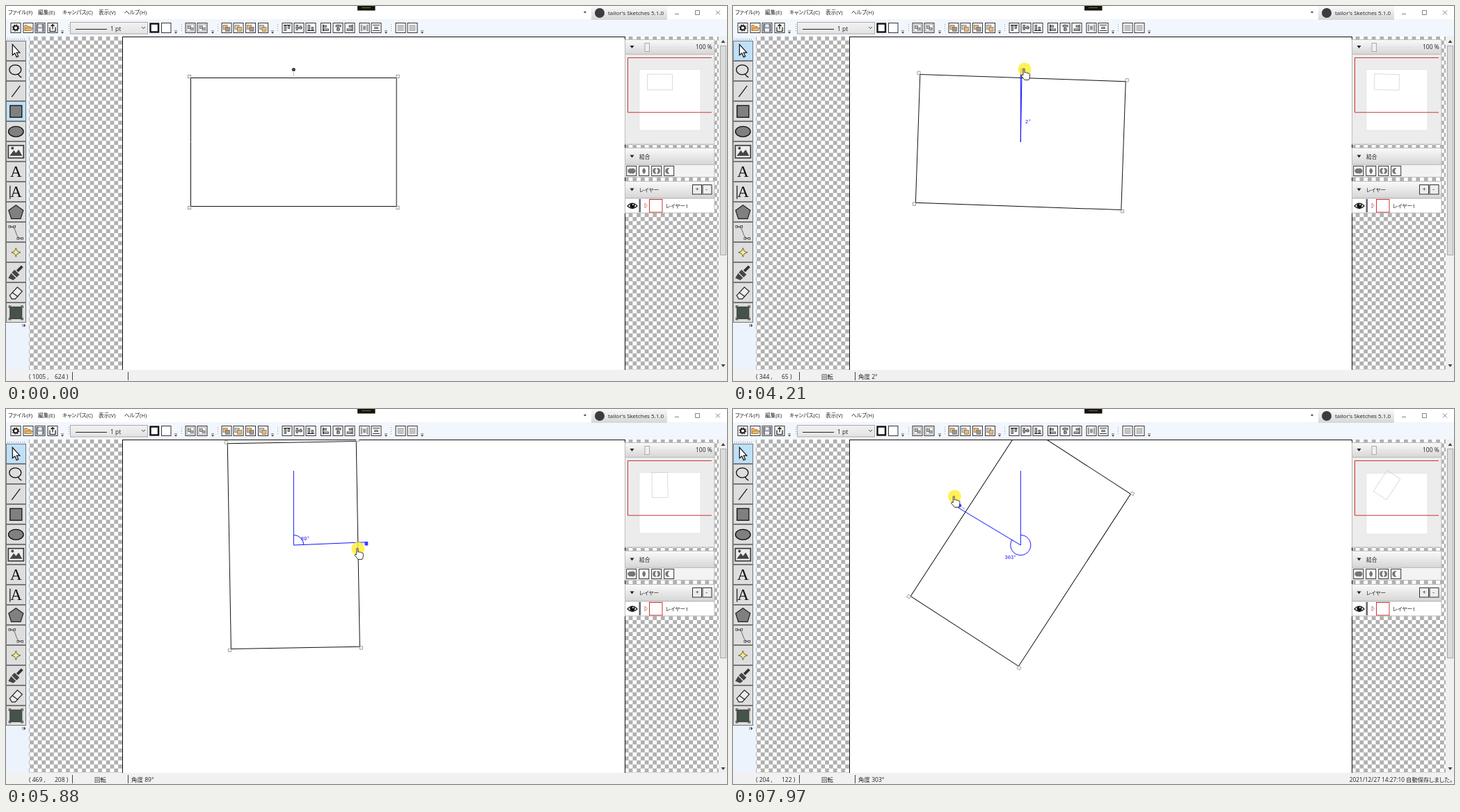
Animation of 1036x540 px, one loop 8000 ms. Source, as an HTML page:

```html
<!DOCTYPE html>
<html lang="ja">
<head>
<meta charset="utf-8">
<title>Rotate a rectangle</title>
<style>
html, body { margin: 0; width: 100%; height: 100%; overflow: hidden; background: #fff; }
svg { display: block; width: 1036px; height: 540px; }
text { font: 8.5px "Open Sans", "Noto Sans CJK JP", "Noto Sans CJK", sans-serif; fill: #222; white-space: pre; }
.kana { font-size: 7.7px; font-feature-settings: "palt"; }
.serif { font: 23px "Liberation Serif", serif; fill: #111; }
.degree { font: 7px "Liberation Mono", monospace; fill: #11f; }
</style>
</head>
<body>
<svg id="stage" viewBox="0 0 1036 540">
  <defs>
    <pattern id="checker" x="166.9" y="44" width="11.552" height="11.552" patternUnits="userSpaceOnUse">
      <path fill="#fff" d="M0 0h11.552v11.552H0z"/>
      <path fill="#b0b0b0" d="M0 0h5.776v5.776H0zM5.776 5.776h5.776v5.776H5.776z"/>
    </pattern>
    <linearGradient id="head" x2="0" y2="1"><stop stop-color="#fafafa"/><stop offset="1" stop-color="#d6d6d6"/></linearGradient>
    <linearGradient id="combo" x2="0" y2="1"><stop stop-color="#f2f2f2"/><stop offset="1" stop-color="#e3e3e3"/></linearGradient>
    <clipPath id="work"><path d="M33 44H889.5V524H33z"/></clipPath>
  </defs>
  <g id="back"></g>
  <g clip-path="url(#work)">
    <g id="shape" fill="none">
      <path stroke="#111" d="M-147.8-92.5H147.8V92.5H-147.8z"/>
      <path stroke="#bbb" d="M0-101V-95"/>
      <path id="ticks" stroke="#777" d="M-148-.5v1M148-.5v1M-.5-92h1M-.5 93h1"/>
      <g id="corners"></g>
      <circle id="knob" cy="-104.5" r="2.6"/>
    </g>
    <g id="guide" fill="none" stroke="#11f">
      <path id="rays"/>
      <path id="arc"/>
      <text id="degree" class="degree" stroke="none"></text>
    </g>
  </g>
  <g id="front"></g>
  <path id="thumbPage" fill="#fff" stroke="#ddd" stroke-width=".6" d="M910 91.5h88v87.5h-88z"/>
  <path id="thumbRect" fill="none" stroke="#ccc" stroke-width=".7" d="M-18-11.3H18V11.3H-18z"/>
  <path fill="none" stroke="#c33" d="M1014 74.5H893.5V153.2H1014"/>
  <g id="status">
    <text id="posX" x="33" y="536.5"></text>
    <text id="posY" x="70" y="536.5"></text>
    <text id="mode" x="127" y="536.5">回転</text>
    <text id="angle" x="180" y="536.5"></text>
    <text id="saved" x="1034" y="536.5" text-anchor="end" style="font-size:8.3px;font-feature-settings:'palt'">2021/12/27 14:27:10 自動保存しました。</text>
  </g>
  <g id="cursor">
    <circle id="glow" r="9.5" fill="#ffee3c" opacity=".85"/>
    <path id="arrow" fill="#fff" stroke="#222" stroke-width=".8" d="M0 0V11.5L2.6 9.2 4.4 13.2 6.2 12.4 4.5 8.5H8z"/>
    <path id="hand" fill="#fff" stroke="#222" stroke-width=".9" stroke-linejoin="round"
      d="M-2 8.5V0Q-1-1.5 0 0V5Q1.4 4 2.4 5.3 4 4.5 5 6 6.8 5.5 7.5 7.2V11Q7.3 13 6 15.5H0Q-1.5 13-4.6 10 -5.3 7.4-2 8.5z"/>
  </g>
</svg>
<script>
const $ = id => document.getElementById(id);
const LOOP = 8000, CX = 413.3, CY = 196, ZOOM = 0.722, RAD = Math.PI / 180;

// ---- static drawing helpers ----
const rect = (x, y, w, h, fill, stroke = 'none', sw = 1) =>
  `<rect x="${x}" y="${y}" width="${w}" height="${h}" fill="${fill}" stroke="${stroke}" stroke-width="${sw}"/>`;
const path = (d, stroke = '#222', fill = 'none', sw = 1) =>
  `<path d="${d}" stroke="${stroke}" fill="${fill}" stroke-width="${sw}"/>`;
const text = (x, y, s, cls = '') => `<text x="${x}" y="${y}" class="${cls}">${s}</text>`;
const at = (x, y, s) => `<g transform="translate(${x} ${y})">${s}</g>`;
const button = (x, y, glyph) => at(x, y, rect(-7, -7, 14, 14, '#fafafa', '#333') + glyph);
const down = (x, y) => path(`M${x} ${y}h6l-3 4z`, 'none', '#222');

function toolIcons() {
  const gray = '#808080';
  const node = (x, y) => rect(x - 1.3, y - 1.3, 2.6, 2.6, '#fff', '#333', .8);
  return [
    path('M-5-9.5V6L-1.5 3.2 1 8.8 3.4 7.7 1 2.4H5.5z', '#111', '#fff', 1.2),
    '<ellipse cx="-1" cy="-2" rx="8.5" ry="7" fill="none" stroke="#111" stroke-width="1.3"/>' + path('M3 4q1 3 5 5', '#111', 'none', 1.3),
    path('M-6 8L6-8', '#111', 'none', 1.2),
    rect(-8.5, -8.5, 17, 17, gray, '#111', 1.3),
    `<ellipse rx="10.8" ry="7.5" fill="${gray}" stroke="#111" stroke-width="1.3"/>`,
    rect(-11, -9, 22, 18, '#eee', '#444', 1.8) + path('M-9 6L-3-2 0 2 4-3 9 6z', 'none', '#444') + '<circle cx="-5" cy="-5" r="2" fill="#444"/>',
    text(-8.4, 7.3, 'A', 'serif'),
    text(-8, 7.3, 'A', 'serif') + path('M-8.5-9V10', '#111', 'none', 1.2),
    path('M0-10L10.5-2.5 6.7 9.5H-6.7L-10.5-2.5z', '#222', gray, 1.2),
    path('M-9-8H-2M-9-8C4-8-4 9 9 9M3 9H9', '#555', 'none', .9) + node(-9, -8) + node(-2, -8) + node(3, 9) + node(9, 9),
    path('M0-6.5L1.8-1.8 6.5 0 1.8 1.8 0 6.5-1.8 1.8-6.5 0-1.8-1.8z', '#554', '#fff07a', .9),
    path('M9-9L2-2', '#333', 'none', 4) + path('M-2-4L5 3 1 7-6 0zM-7 1L0 8-4 11-11 8z', 'none', '#444'),
    path('M-9 4L2-8 9-2-1 9H-6zM-5 0L3 6', '#222', '#eee', 1.2),
    rect(-8.5, -8.5, 17, 17, '#46534a', '#333') + path('M-10-7V-10H-7M7-10h3v3M10 7v3H7M-7 10h-3V7', '#333')
  ];
}

function topBar() {
  const orange = '#e9b96e', gray = '#999';
  const order = i => rect(-5, -4, 6, 6, i % 2 ? '#ccc' : orange, '#765', .7) + rect(-1.5, -1, 6, 6, i % 2 ? orange : gray, '#765', .7);
  const align = (turn, shift) => `<g transform="rotate(${turn})">` + path(`M-5 ${shift}H5`, '#222') +
    rect(-4, shift < 0 ? -3 : -4, 2.6, 7, '#aaa', '#333', .7) + rect(1, shift < 0 ? -3 : shift ? -1 : -2.5, 2.6, 4, '#aaa', '#333', .7) + '</g>';
  const pair = turn => `<g transform="rotate(${turn})">` + path('M-4-5V5M4-5V5M-1-3v6M1-3v6', '#333') + '</g>';
  const group = rect(-5, -5, 10, 10, 'none', '#888', .7) + rect(-3.5, -3, 4, 4, '#bbb', '#555', .7) + rect(0, 0, 4, 3, '#bbb', '#555', .7);
  let s = button(14, 31.5, '<circle r="3.1" fill="none" stroke="#222" stroke-width="2"/><circle r="4.6" fill="none" stroke="#222" stroke-width="1.3" stroke-dasharray="1.8"/>');
  s += button(32, 31.5, path('M-5 4V-4H-2L-1-2H3V0M-5 4L-3 0H6L4 4z', '#b8823c', orange));
  s += button(49, 31.5, rect(-5, -5, 10, 10, '#8c98a4', '#445') + rect(-2.5, -5, 5, 4, '#eee') + rect(-3, 1, 6, 4, '#fff'));
  s += button(67, 31.5, path('M-4-1V5H4V-1M0 2V-5M-2.5-2.5L0-5 2.5-2.5', '#111', 'none', 1.2));
  s += rect(92.5, 23.5, 111, 16.5, 'url(#combo)', '#aaa') + path('M100 33.5H145', '#222') + text(150, 35.5, '1 pt') + path('M195 30l2.5 2.5L200 30', '#444');
  s += rect(207.5, 25.5, 11.5, 12, '#fff', '#111', 2.4) + rect(223.5, 24.5, 13.5, 14, '#fff', '#333');
  [265, 282].forEach(x => s += button(x, 31.5, group));
  [317, 334, 351.5, 369.5].forEach((x, i) => s += button(x, 31.5, order(i)));
  [[404, 0, -4], [421, 0, 0], [438, 0, 4], [459.5, -90, -4], [477, 90, 0], [494, -90, 4]].forEach(([x, r, d]) => s += button(x, 31.5, align(r, d)));
  s += button(515, 31.5, pair(0)) + button(532, 31.5, pair(90));
  [567, 584].forEach(x => s += button(x, 31.5, rect(-4, -4, 8, 8, '#c4c4c4', '#aaa', .7)));
  [81, 244, 297, 383, 546, 598].forEach(x => s += path(`M${x - 2} 35.5h4M${x - 1.5} 37.5h3l-1.5 2z`, '#444', '#444', .6));
  [90, 252, 304, 390, 553].forEach(x => s += `<path d="M${x}.5 26V38" stroke="#999" stroke-dasharray="1 2"/>`);
  return s;
}

function titleBar() {
  return rect(841, 0, 109, 20, 'url(#head)') + '<circle cx="853" cy="10" r="7" fill="#3c3c40"/>' +
    `<g style="font-size:8px">${text(865, 13, "tailor's Sketches 5.1.0").replace('<text', '<text style="font-size:inherit"')}</g>` +
    path('M830 8h4l-2 2.5z', 'none', '#333') + path('M961 11.5h6M990.5 6.5h6v6h-6zM1020 6.5l6 6M1026 6.5l-6 6', '#777', 'none', .9) +
    rect(505, 0, 25.5, 6.5, '#15130c') + path('M511 2.5h13', '#766b3c') +
    [[3, 'ファイル(F)'], [46, '編集(E)'], [81, 'キャンパス(C)'], [133, '表示(V)'], [170, 'ヘルプ(H)']].map(([x, t]) => text(x, 11.5, t, 'kana')).join('');
}

function panels() {
  const header = (y, h, label) => rect(889.5, y, 128.5, h, 'url(#head)', '#bbb') + down(896.5, y + h / 2 - 2) + text(910, y + h / 2 + 3, label, 'kana');
  const body = (y, h, fill) => rect(889.5, y, 128.5, h, fill, '#bbb');
  const sign = (x, t) => rect(x, 257.5, 13, 13.5, '#eee', '#333') + text(x + 4.2, 267, t);
  const joins = ['M-5 0a3.5 3.5 0 0 1 5-3 3.5 3.5 0 1 1 0 6 3.5 3.5 0 0 1-5-3z', 'M0-4Q4 0 0 4-4 0 0-4z', 'M-1-4Q-5-4-5 0T-1 4Q-4 0-1-4zM1-4Q5-4 5 0T1 4Q4 0 1-4z', 'M0-4Q-5-4-5 0T0 4Q-4 0 0-4z'];
  return header(48.5, 21, '') + body(69.5, 129.5, '#ececec') + rect(918, 53.5, 6.5, 12, '#f0f0f0', '#aaa') + path('M926 59.5h54', '#e2e2e2') + text(991, 62, '100 %') +
    header(204.5, 24, '結合') + body(228.5, 18, '#f3f3f3') +
    joins.map((d, i) => button(898.7 + 18 * i, 237.5, path(d, '#555', '#777', .6))).join('') +
    header(252.5, 24, 'レイヤー') + sign(986.5, '+') + sign(1001, '-') +
    body(277, 21, '#fff') + path('M893 288Q900 280 907 288 900 295 893 288z', '#111', '#fff', 1.2) +
    '<circle cx="900" cy="287.5" r="3.6" fill="#111"/><circle cx="901" cy="286" r="1" fill="#fff"/>' +
    rect(909.5, 278, 2.5, 19, '#667') + path('M918 284v7l3.5-3.5z', '#b77', '#fff', .9) + rect(924.5, 278.5, 18.5, 18.5, '#fff', '#c33') + text(948, 290.5, 'レイヤー1', 'kana');
}

$('back').innerHTML = rect(0, 0, 1036, 540, '#fff') + rect(0, 19, 1036, 25, '#f2f6fd') + rect(0, 44, 33, 480, '#ecf3fd') +
  rect(33, 44, 991, 480, 'url(#checker)') + rect(167.5, 44.5, 722, 490, '#fff', '#111');
$('front').innerHTML = titleBar() + topBar() +
  '<path d="M2 48H28" stroke="#678" stroke-dasharray="1 2"/>' +
  toolIcons().map((icon, i) => `<rect id="tool${i}" x=".5" y="${50.5 + 29 * i}" width="28" height="28" stroke="#777"/>` + at(14.3, 64.8 + 29 * i, icon)).join('') +
  path('M24 458v4M26 458l2 2-2 2z', '#444', '#444', .7) +
  panels() + rect(1024, 44, 12, 480, '#f0f0f0') + rect(1026.5, 57.5, 8, 301, '#dcdcdc', '#aaa') +
  path('M1027.5 53l3-4 3 4zM1027.5 516l3 4 3-4z', 'none', '#444') +
  rect(0, 524, 1036, 16, '#f1f1f1') + path('M95.5 527v12M175.5 527v12', '#444');
$('corners').innerHTML = [[-1, -1], [1, -1], [1, 1], [-1, 1]].map(([x, y]) => rect(x * 149.7 - 2.1, y * 94.5 - 2.1, 4.2, 4.2, '#fff', '#888', .8)).join('');

// ---- motion: step number, then the values to reach ----
const STEP = 69.4, GRAB = 54;
const roam = [ // x, y
  [0, 975, 500], [5, 750, 310], [10, 450, 125], [12, 414, 97], [13, 412, 95], [15, 412, 95],
  [22, 300, 76], [27, 170.2, 65.8], [30, 26.5, 61.5], [33, 13, 63], [35, 15, 64], [39, 245, 78], [45, 390, 92], [49, 417, 92], [GRAB, 417, 92]
];
const turn = [ // mouse angle and radius, ray angle, drawn pointer angle and radius, label x and y
  [GRAB, 0.4, 104.5, 0, 2, 104, 420, 169],
  [56, 1.67, 105.11, 1, 3.1, 105.2, 420, 169],
  [65, 11, 101, 9, 13.5, 100, 421, 170],
  [71, 25.98, 96, 23.7, 29.3, 94, 423, 173.5],
  [88, 144.7, 91.53, 144.5, 149.8, 91.4, 424.5, 202],
  [97, 229.96, 113.87, 227.3, 232, 115.4, 408, 215.5],
  [110, 303.11, 117, 301, 306.4, 118, 390.5, 216]
];

function sample(keys, n) {
  const i = keys.findIndex(k => k[0] >= n);
  if (i < 1) return keys.at(i).slice(1);
  const a = keys[i - 1], b = keys[i], p = (n - a[0]) / (b[0] - a[0]);
  return a.slice(1).map((v, j) => v + (b[j + 1] - v) * p);
}
const polar = (deg, r) => [CX + r * Math.sin(deg * RAD), CY - r * Math.cos(deg * RAD)];
const show = (id, on) => $(id).style.display = on ? '' : 'none';

function draw(n) {
  const turning = n >= GRAB;
  const [mouseAngle, mouseR, ray, pointerAngle, pointerR, labelX, labelY] = sample(turn, Math.max(n, GRAB));
  const angle = Math.round(mouseAngle);
  const pointer = turning ? polar(pointerAngle, pointerR) : sample(roam, n);
  const mouse = turning ? polar(mouseAngle, mouseR) : pointer;
  const readout = n < 0 ? [1005, 624] : mouse[0] < 168 ? [3, 30] : [(mouse[0] - 168) / ZOOM, (mouse[1] - 44) / ZOOM].map(Math.round);

  $('shape').setAttribute('transform', `translate(${CX} ${CY}) rotate(${angle})`);
  $('thumbRect').setAttribute('transform', `translate(939.5 109.5) rotate(${angle})`);
  $('thumbPage').setAttribute('transform', `translate(0 ${n >= 90 ? 1 : 0})`);
  $('knob').setAttribute('fill', turning ? '#44f' : '#444');
  show('ticks', !turning);

  const [ex, ey] = polar(ray, 107), [ax, ay] = polar(ray, 14.5);
  $('rays').setAttribute('d', `M${CX} 89V${CY}L${ex} ${ey}`);
  $('arc').setAttribute('d', `M${CX} ${CY - 14.5}A14.5 14.5 0 ${ray > 180 ? 1 : 0} 1 ${ax} ${ay}`);
  $('degree').textContent = angle + '°';
  $('degree').setAttribute('x', labelX);
  $('degree').setAttribute('y', labelY);
  $('angle').textContent = `角度 ${angle}°`;
  ['guide', 'mode', 'angle'].forEach(id => show(id, turning));
  show('saved', n >= 84);

  $('posX').textContent = `( ${readout[0]} ,`;
  $('posY').textContent = `${readout[1]} )`;

  const picked = n < 34 ? 3 : 0;
  for (let i = 0; i < 14; i++) $('tool' + i).setAttribute('fill', i === picked ? '#bfe0f7' : '#dedede');

  const hand = turning || n >= 48 || (n >= 12 && n < 16);
  $('cursor').setAttribute('transform', `translate(${pointer})`);
  show('cursor', n >= 0);
  show('hand', hand);
  show('arrow', !hand);
  show('glow', turning || n === 33);
}

function tick() {
  const t = performance.now() % LOOP;
  draw(Math.min(110, Math.floor((t - 320) / STEP)));
  requestAnimationFrame(tick);
}
tick();
</script>
</body>
</html>
```
